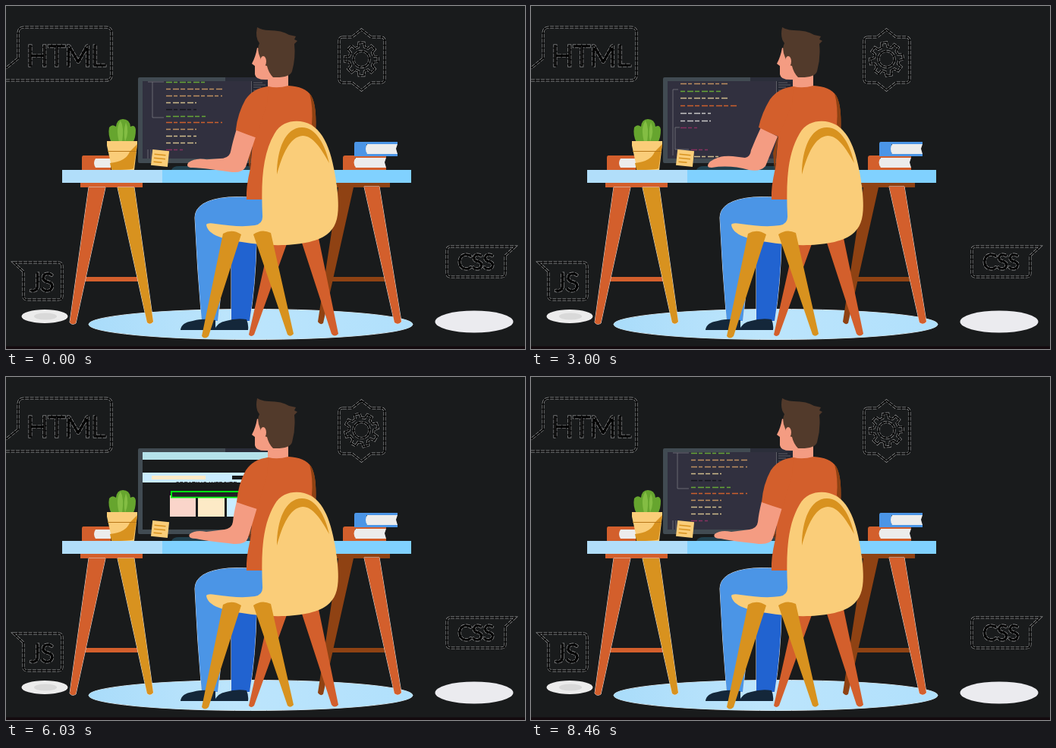
These frames come from a looping animation (684x452 px, 8530 ms). An HTML page:

```html
<!DOCTYPE html>
<html lang="en">
<head>
<meta charset="utf-8">
<title>Developer at a desk</title>
<style>
html, body { margin: 0; width: 100%; height: 100%; overflow: hidden; background: #191b1c; }
svg { display: block; width: 684px; height: 452px; }
.label { font-family: Lato, "Open Sans", sans-serif; font-weight: 300; fill: none; }
.halo { stroke: #9a9b9c; stroke-width: 3px; stroke-dasharray: 5 1.5; }
.halo text { stroke-width: 1.8px; }
.ink { stroke: #000; stroke-width: 1.7px; }
.ink text { fill: #000; stroke-width: .5px; }
.edge { stroke: #e6e6e6; stroke-width: 1px; paint-order: stroke; }
.orange { fill: #d35f2c; } .gold { fill: #d8921f; } .brown { fill: #8f4213; }
.cream { fill: #facd79; } .skin { fill: #f49c82; } .page { fill: #ececec; }
</style>
</head>
<body>
<svg viewBox="0 0 684 452" xmlns="http://www.w3.org/2000/svg">
<defs>
  <clipPath id="screenClip"><rect x="180" y="99" width="172" height="102"/></clipPath>
  <linearGradient id="floor"><stop stop-color="#a9dcfa"/><stop offset=".45" stop-color="#bde5fc"/><stop offset="1" stop-color="#b0e0fc"/></linearGradient>
  <g id="labels">
    <path d="M0 98H132Q139 98 139 91V35Q139 28 132 28H24Q16 28 16 36V69L0 82"/>
    <path d="M10 338H69Q74 338 74 343V382Q74 387 69 387H28Q23 387 23 382V350Z"/>
    <path d="M586 317H671L658 329V352Q658 357 653 357H586Q581 357 581 352V322Q581 317 586 317Z"/>
    <path d="M444 41H456L468.500 31L481 41H494Q499 41 499 46V96Q499 101 494 101H481L468.500 111L456 101H444Q439 101 439 96V46Q439 41 444 41Z"/>
    <text x="27" y="78.500" font-size="38">HTML</text>
    <text x="32" y="376" font-size="33">JS</text>
    <text x="595.500" y="346.500" font-size="27.500">CSS</text>
  </g>
  <path id="gearShape"/>
</defs>

<rect width="684" height="452" fill="#191b1c"/>
<rect y="448.500" width="684" height="3.500" fill="#130a0e"/>

<g class="label">
  <use href="#labels" class="halo"/>
  <use href="#labels" class="ink"/>
  <g id="gear">
    <use href="#gearShape" class="halo"/>
    <use href="#gearShape" class="ink"/>
  </g>
</g>

<ellipse class="edge" cx="322.500" cy="419.500" rx="213.500" ry="20" fill="url(#floor)"/>
<ellipse cx="51" cy="409" rx="30.500" ry="9" fill="#ececec"/>
<ellipse cx="52" cy="409" rx="15" ry="4.500" fill="#d9d9d9"/>
<ellipse cx="617" cy="416" rx="51.500" ry="14.500" fill="#ebebef"/>

<!-- monitor -->
<rect x="174" y="94" width="178" height="113" rx="2" fill="#414b52"/>
<path d="M289 94H352V207H330V99H289Z" fill="#2b2e3a"/>
<g clip-path="url(#screenClip)">
  <rect id="screen" x="180" y="99" width="172" height="102"/>
  <g id="site"></g>
  <g id="code"><g id="lines"></g>
    <rect x="323" y="99" width="30" height="19" fill="#252733"/>
    <path d="M323.500 99V118M326 101H338M326 104H342M326 107H336M326 111H341M326 114H333" stroke="#77777c" stroke-width=".7"/>
  </g>
  <g id="loader">
    <text x="223" y="145" font-family="Roboto, sans-serif" font-size="9" fill="#1b1b1b">CREATING WEBSITE...</text>
    <rect id="track" x="218" y="151" width="110" height="7.500" fill="#d5d5d5" stroke="#00f010" stroke-width="2"/>
    <rect id="progress" x="219" y="152" height="5.500" fill="#202124"/>
  </g>
</g>
<g transform="rotate(6 203 201)"><rect x="192" y="190" width="22" height="21" class="cream"/>
  <path d="M195 196H210M195 201H210M195 206H206" stroke="#d8921f" stroke-width="1.500"/></g>
<path d="M218 216Q220 211 228 211H322V216Z" fill="#21414f"/>

<!-- trestles -->
<path class="brown" d="M436 233H506V239H458L418 418Q414 421 411 416L438 239H436ZM428 357H503V363H428Z"/>
<path class="orange edge" d="M472 238H492L521 416Q517 421 512 417Z"/>
<path class="orange" d="M98 233H180V239H98ZM104 357H175V363H104Z"/>
<path class="orange edge" d="M109 239H131L92 418Q87 421 84 417Z"/>
<path class="gold edge" d="M147 239H169L194 416Q190 421 186 417Z"/>

<!-- books and cactus -->
<path class="orange" d="M102 197H138V216H100V200Q100 197 102 197ZM447 197H501V200H460V212H501V216H444V200Q444 197 447 197Z"/>
<path class="page" d="M118 201H138V213H118Q114 207 118 201ZM461 200H501L499 206L501 213H461Q456 206 461 200Z"/>
<path d="M461 179H516V182H475V194H516V198H459V182Q459 179 461 179Z" fill="#4b95e6"/>
<path class="page" d="M476 182H516L514 188L516 195H476Q472 188 476 182Z"/>
<path d="M139 180Q134 170 136 160Q140 155 145 159Q146 149 154 149Q163 149 164 159Q170 156 171 163Q171 174 167 180Z" fill="#66a52e"/>
<path d="M149 179Q144 160 151 151Q156 160 153 179ZM157 179Q163 165 158 153Q154 166 157 179Z" fill="#83bd43"/>
<path class="cream" d="M133 178H173V182L169 216H140L133 184Z"/>
<path class="gold" d="M173 182L168 214Q165 216 139 216L137 207Q158 205 163 192Z"/>
<path d="M134 191.500H172" stroke="#b77719" stroke-width="1"/>

<!-- desk top -->
<rect x="74" y="216" width="460" height="17" fill="#80d1ff"/>
<rect x="74" y="216" width="132" height="17" fill="#b1defa"/>

<!-- seated figure -->
<path class="edge" d="M297 310H330Q329 365 321 415H297Z" fill="#2163d0"/>
<path class="edge" d="M338 253Q312 251 293 252Q249 256 249 279Q252 345 258 415H279L290 316L300 300L340 297Z" fill="#4b95e6"/>
<path d="M230 427Q231 417 246 415Q258 411 276 414V427ZM275 427Q278 417 290 415Q303 411 317 413Q320 420 319 427Z" fill="#14273a"/>
<path class="skin" d="M331 55Q329 67 324 76L328 79V90Q329 98 345 97V110Q358 113 372 107V70Z"/>
<path d="M331 28Q338 32 346 32Q364 32 373 38L382 40L380 44L384 46L380 50Q382 68 377 86Q374 95 352 94Q346 88 344 79Q337 78 335 68Q330 57 334 49Q328 42 331 28Z" fill="#523a2b"/>
<ellipse class="skin" cx="339" cy="73" rx="4" ry="7"/>
<path class="orange" d="M346 106Q358 109 372 105Q394 106 402 118Q410 131 408 170L390 255H317Q316 239 322 214L326 170L320 120Q332 108 346 106Z"/>
<path class="brown" d="M400 115Q410 126 408 162L403 156Q405 133 400 115Z"/>
<path class="brown" d="M326 168L321 217L319 194Z"/>
<path id="arm" class="skin"/>
<path id="sleeve" class="orange"/>

<!-- chair -->
<path class="orange" d="M348 308H372L327 433Q323 437 320 433ZM388 306H412L438 432Q433 437 429 432Z"/>
<path class="cream" d="M338 276C336 231 338 195 354 168C363 152 380 150 393 153C420 160 430 194 436 237C440 272 438 289 423 301C402 317 351 318 311 311C280 307 265 299 264 288Q266 285 276 287Q308 292 328 289Q339 287 338 276Z"/>
<path class="gold" d="M357 222C357 189 368 160 390 160C409 160 421 184 426 207C415 187 404 171 391 171C374 172 364 196 357 222Z"/>
<path class="gold" d="M286 300Q298 293 310 301L267 435Q262 440 258 435ZM326 301Q337 293 349 299L379 432Q375 437 371 433Z"/>
</svg>

<script>
const LOOP = 8530, STEP = 30, SVG = "http://www.w3.org/2000/svg";
const $ = id => document.getElementById(id);
const lerp = (a, b, k) => a + (b - a) * k;
const clamp = v => Math.max(0, Math.min(1, v));
const ramp = (t, from, to) => clamp((t - from) / (to - from));
const smooth = k => k * k * (3 - 2 * k);

function add(parent, tag, attrs) {
  const el = document.createElementNS(SVG, tag);
  for (const key in attrs) el.setAttribute(key, attrs[key]);
  return parent.appendChild(el);
}
const set = (id, key, value) => $(id).setAttribute(key, value);

function mix(a, b, k) {
  const part = (hex, i) => parseInt(hex.slice(i, i + 2), 16);
  return "rgb(" + [1, 3, 5].map(i => Math.round(lerp(part(a, i), part(b, i), k))) + ")";
}

function track(t, keys) {
  for (let i = 1; i < keys.length; i++) {
    const [t0, a] = keys[i - 1], [t1, b] = keys[i];
    if (t <= t1) return lerp(a, b, smooth(ramp(t, t0, t1)));
  }
  return keys[keys.length - 1][1];
}

function morph(from, to, k) {
  const goal = to.match(/-?\d+/g);
  let i = 0;
  return from.replace(/-?\d+/g, n => lerp(+n, +goal[i++], k).toFixed(2));
}

// Gear outline with a hole, centred on the origin.
function gearPath() {
  const teeth = 8, points = [];
  for (let i = 0; i < teeth; i++)
    for (const [offset, r] of [[-.3, 16.5], [-.2, 22], [.2, 22], [.3, 16.5]]) {
      const a = (i + offset) * 2 * Math.PI / teeth;
      points.push((r * Math.cos(a)).toFixed(2) + " " + (r * Math.sin(a)).toFixed(2));
    }
  return `M${points.join("L")}ZM10.500 0A10.500 10.500 0 1 1 -10.500 0A10.500 10.500 0 1 1 10.500 0Z`;
}
set("gearShape", "d", gearPath());

// Code blocks: one letter is one line's colour.
const inks = { g: "#66a637", o: "#cc5f2d", t: "#bd8f60", c: "#cdbb8c", w: "#c6c6c6", k: "#15161d", m: "#86305f" };
const blocks = [
  [100, 211, 8.9, "gttckgotccm", [52, 74, 74, 40, 40, 52, 74, 40, 40, 40, 22]],
  [217, 211, 9.4, "mcgctwwg", [22, 77, 52, 62, 74, 40, 40, 52]],
  [302, 197, 9.7, "tgcowwm", [63, 53, 63, 75, 40, 40, 22]],
  [389, 211, 9, "m", [22]],
  [398, 197, 9.3, "cgctgwk", [50, 53, 63, 53, 60, 40, 40]]
];
for (const [top, x, gap, colours, lengths] of blocks)
  [...colours].forEach((c, i) => add($("lines"), "path", {
    d: `M${x} ${Math.round(top + i * gap) + .5}h${lengths[i]}`, stroke: inks[c],
    "stroke-width": 1.4, "stroke-dasharray": i % 2 ? "6 3 8 2" : "8 2 5 3"
  }));
add($("lines"), "path", {
  d: "M208 100H187M193 100V147H208M187 189V237H208M191 189V219H210M194 310H187V397M196 360H190V389H208",
  fill: "none", stroke: "#77777e", "stroke-width": .8
});

// Page parts: x, y, width, height, colour.
const parts = [
  [180, 99, 172, 10, "#50bbce"],
  [180, 126, 172, 13, "#80d1ff"],
  [192, 130, 71, 5, "#facd79"],
  [298, 130, 30, 5, "#191b1c"],
  [216, 156, 34, 28, "#f49c82"],
  [253, 156, 35, 28, "#facd79"],
  [291, 156, 35, 28, "#80d1ff"],
  [180, 201, 172, 42, "#50bbce"],
  [197, 210, 48, 32, "#facd79"],
  [257, 224, 48, 2, "#e4f5fb"],
  [257, 228, 48, 2, "#e4f5fb"],
  [257, 232, 48, 2, "#e4f5fb"]
].map(([x, y, width, height, fill]) =>
  ({ fill, el: add($("site"), "rect", { x, y, width, height }) }));
add($("site"), "path", { d: "M187 227V233L182 230Z", fill: "#facd79" });

const armRest = "M304 164Q300 180 299 191Q298 199 288 201L264 204Q250 201 242 207Q239 213 250 213Q264 216 300 220Q316 221 319 212L331 172Z";
const armReach = "M303 160Q296 175 290 190Q289 199 282 200L266 198Q250 196 236 205Q229 213 238 213Q262 209 287 216Q302 219 309 211L325 172Z";
const sleeveRest = "M346 106Q326 108 316 123Q306 141 304 165Q318 170 331 174L344 130Z";
const sleeveReach = "M346 106Q326 108 315 123Q304 141 300 160Q314 167 326 172L344 130Z";
const reachKeys = [[0, .3], [660, .15], [1320, .3], [2200, .3], [3000, 1], [3600, .6], [4300, 0], [LOOP, 0]];

function render(time) {
  const t = Math.min(Math.floor(time / STEP) * STEP, 8460);
  const loading = ramp(t, 4140, 4350);
  const tint = ramp(t, 5700, 6480);
  const back = ramp(t, 7890, 8370);
  const siteOn = t >= 5850;

  set("gear", "transform", `translate(468.500 70) rotate(${t * 360 / LOOP})`);

  const reach = track(t, reachKeys);
  set("arm", "d", morph(armRest, armReach, reach));
  set("sleeve", "d", morph(sleeveRest, sleeveReach, reach));

  set("screen", "fill", siteOn ? mix("#191b1c", "#31303f", back) : mix("#31303f", "#cfcfcf", loading));

  const scroll = t < 5850 ? Math.min(t / 15, 283) : 0;
  set("lines", "transform", `translate(0 ${-scroll})`);
  set("code", "opacity", siteOn ? back : 1 - .78 * loading);

  set("loader", "opacity", siteOn ? 1 - ramp(t, 6060, 6270) : ramp(t, 4080, 4320));
  set("track", "fill", siteOn ? "#27332a" : "#d5d5d5");
  set("progress", "width", 108 * ramp(t, 4020, 5790));

  set("site", "opacity", siteOn ? 1 - back : 0);
  set("site", "transform", `translate(0 ${-41 * smooth(ramp(t, 6060, 7500))})`);
  for (const { el, fill } of parts)
    el.setAttribute("fill", fill === "#191b1c" ? fill : mix("#ffffff", fill, tint));
}

function frame() {
  render(performance.now() % LOOP);
  requestAnimationFrame(frame);
}
frame();
</script>
</body>
</html>
```
